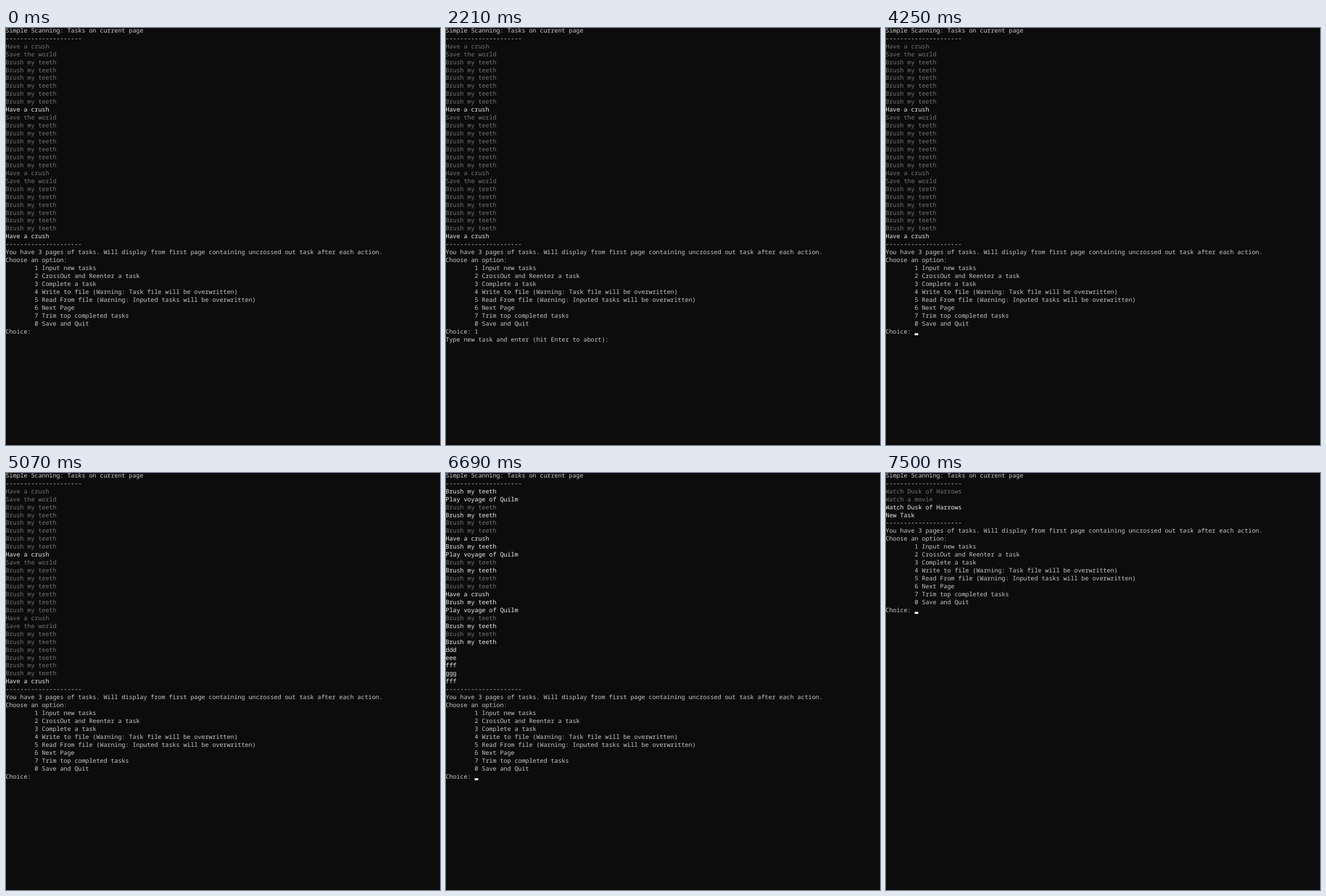
An HTML page that plays this animation: 763x734 px, repeating every 8 s.

```html
<!DOCTYPE html>
<html lang="en">
<head>
<meta charset="utf-8">
<title>Task list console</title>
<style>
  html, body { margin: 0; width: 100%; height: 100%; overflow: hidden; background: #0c0c0c; }
  svg { display: block; }
  text {
    font: 10.63px "Noto Sans Mono", "DejaVu Sans Mono", monospace;
    white-space: pre;
    text-rendering: geometricPrecision;
  }
</style>
</head>
<body>
<svg id="screen" width="763" height="734" viewBox="0 0 763 734"></svg>
<script>
const NS = "http://www.w3.org/2000/svg";
const LOOP = 8000;
const COL = 6.378, ROW = 13.945, LEFT = -0.7, BASE = 7.8;
const PLAIN = "#cccccc", OPEN = "#f2f2f2", DONE = "#767676";
const RULE = "-".repeat(21);
const ASK = "Type new task and enter (hit Enter to abort): ";
const MENU = [
  "1 Input new tasks",
  "2 CrossOut and Reenter a task",
  "3 Complete a task",
  "4 Write to file (Warning: Task file will be overwritten)",
  "5 Read From file (Warning: Inputed tasks will be overwritten)",
  "6 Next Page",
  "7 Trim top completed tasks",
  "0 Save and Quit"
];

const TEETH = "Brush my teeth", CRUSH = "Have a crush", PLAY = "Play voyage of Quilm";
const task = (text, open) => ({ text, color: open ? OPEN : DONE });

const firstPage = Array.from({ length: 25 }, (_, i) =>
  task([CRUSH, "Save the world"][i % 8] || TEETH, i === 8 || i === 24));

const cycle = [TEETH, PLAY, TEETH, TEETH, TEETH, TEETH, CRUSH];
const secondPage = Array.from({ length: 20 }, (_, i) =>
  task(cycle[i % 7], i === 19 || ![2, 4, 5].includes(i % 7)))
  .concat(["ddd", "eee", "fff", "ggg", "fff"].map(s => task(s, true)));

const thirdPage = [
  task("Watch Dusk of Harrows", false),
  task("Watch a movie", false),
  task("Watch Dusk of Harrows", true),
  task("New Task", true)
];

// Each step: start time, page, typed choice, new task text (null before the prompt), cursor shown.
const steps = [
  [0, firstPage, "", null, false],
  [790, firstPage, "", null, true],
  [1210, firstPage, "1", null, false],
  [1610, firstPage, "1", "", true],
  [2210, firstPage, "1", "", false],
  [2830, firstPage, "1", "N", false],
  [3040, firstPage, "1", "New", true],
  [3250, firstPage, "1", "New ", true],
  [3430, firstPage, "1", "New ", false],
  [3650, firstPage, "1", "New T", true],
  [3850, firstPage, "1", "New Tas", false],
  [4050, firstPage, "1", "New Task", true],
  [4250, firstPage, "", null, true],
  [5070, firstPage, "", null, false],
  [5470, firstPage, "", null, true],
  [6090, firstPage, "", null, false],
  [6490, firstPage, "6", null, false],
  [6690, secondPage, "", null, true],
  [7300, null, "", null, true],
  [7500, thirdPage, "", null, true]
];

const screen = document.getElementById("screen");

function add(tag, attrs, content = "") {
  const node = document.createElementNS(NS, tag);
  for (const key in attrs) node.setAttribute(key, attrs[key]);
  node.textContent = content;
  screen.append(node);
}

function print(row, col, text, fill = PLAIN) {
  add("text", { x: LEFT + col * COL, y: BASE + row * ROW, fill }, text);
}

function cursor(row, col) {
  add("rect", {
    x: LEFT + col * COL, y: BASE + row * ROW - 0.4,
    width: COL, height: 3.4, fill: "#ffffff"
  });
}

function draw([, page, choice, entry, blink]) {
  screen.replaceChildren();
  add("rect", { width: 763, height: 734, fill: "#0c0c0c" });
  if (!page) return cursor(39, 0);

  let row = 0;
  print(row++, 0, "Simple Scanning: Tasks on current page");
  print(row++, 0, RULE);
  for (const { text, color } of page) print(row++, 0, text, color);
  print(row++, 0, RULE);
  print(row++, 0, "You have 3 pages of tasks. Will display from first page containing uncrossed out task after each action.");
  print(row++, 0, "Choose an option:");
  for (const item of MENU) print(row++, 8, item);

  let line = "Choice: " + choice;
  print(row, 0, line);
  if (entry !== null) {
    line = ASK + entry;
    print(++row, 0, line);
  }
  if (blink) cursor(row, line.length);
}

let shown = null;
function update(time) {
  const t = time % LOOP;
  const step = steps.findLast(s => s[0] <= t);
  if (step !== shown) draw(shown = step);
}

const start = performance.now();
function tick() {
  update(performance.now() - start);
  requestAnimationFrame(tick);
}
tick();
</script>
</body>
</html>
```
